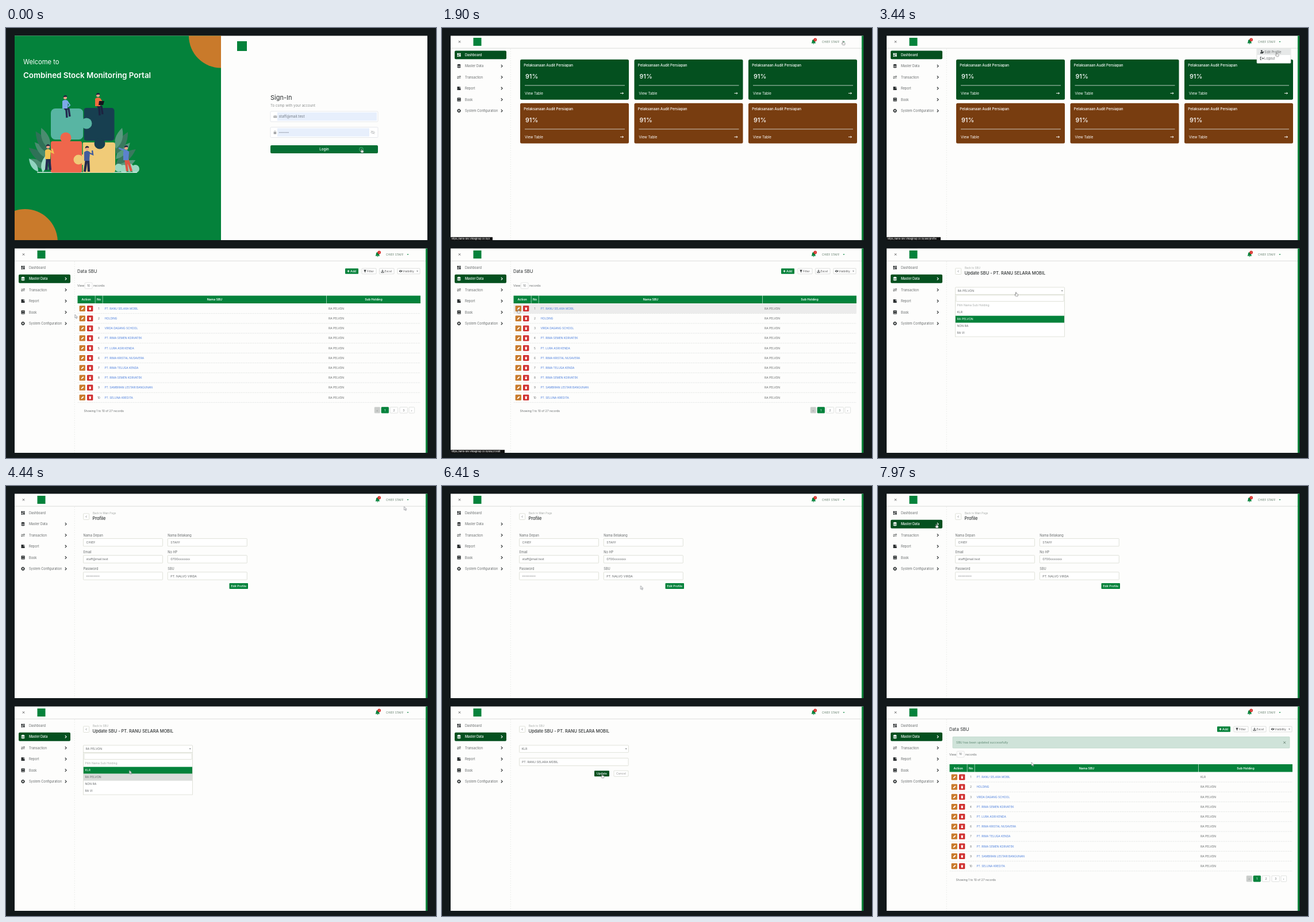
Animation of 748 by 748 pixels, one loop 8 s. Source, as an HTML page:

```html
<!DOCTYPE html>
<html lang="id">
<head>
<meta charset="utf-8">
<title>Dashboard walkthrough</title>
<style>
html, body { margin: 0; width: 100%; height: 100%; overflow: hidden; background: #12181a; }
svg { display: block; width: 100%; height: 100%; font-family: Inter, "Open Sans", sans-serif; }
</style>
</head>
<body>
<script>
const LOOP = 8000;
const GREEN = '#04823b', DEEP = '#04501f', BROWN = '#783d10', ORANGE = '#c97a2b';
const PAPER = '#fdfdfc', INK = '#2b2f30', GREY = '#666a6b', PALE = '#a4a8a6', EDGE = '#d3d6ca';
const FIRST = 'CHIEF', LAST = 'STAFF', MAIL = 'staff@mail.test';
const HOST = 'https://iams-dev.virdagroup.co.id/';
const UNITS = ['PT. RANU SELARA MOBIL', 'HOLDING', 'VIRDA DAGANG SCHOOL', 'PT. RIMA SEMEN KORVATEK',
  'PT. LURA ASRI KENDA', 'PT. RIMA KRISTAL NUSAVERA', 'PT. RIMA TELUGA KENDA', 'PT. RIMA SEMEN KORVATEK',
  'PT. SAMBIRAN LESTARI BANGUNAN', 'PT. SELUNA KREDITA'];
const MAIN_HOLDING = 'RA PELVON', NEW_HOLDING = 'KLR';

let css = '', serial = 0;

// Drawing helpers; text is placed by its vertical centre.
const text = (x, y, size, str, fill = GREY, extra = '') =>
  `<text x="${x}" y="${y + size * .36}" font-size="${size}" fill="${fill}" ${extra}>${str}</text>`;
const MID = 'text-anchor="middle"', MEDIUM = 'font-weight="500"', BOLD = 'font-weight="600"';
const rect = (x, y, w, h, fill, r = 0, stroke = 'none') =>
  `<rect x="${x}" y="${y}" width="${w}" height="${h}" rx="${r}" fill="${fill}" stroke="${stroke}" stroke-width=".7"/>`;
const circle = (x, y, r, fill) => `<circle cx="${x}" cy="${y}" r="${r}" fill="${fill}"/>`;
const shape = (d, fill) => `<path d="${d}" fill="${fill}"/>`;
const line = (d, stroke = INK, w = .8, extra = '') =>
  `<path d="${d}" fill="none" stroke="${stroke}" stroke-width="${w}" ${extra}/>`;
const at = (x, y, body) => `<g transform="translate(${x} ${y})">${body}</g>`;
const caret = (x, y, fill = GREY) => shape(`M${x - 1.5} ${y - .8}h3l-1.5 1.8z`, fill);

// Shows a group only between two times of the loop.
function during(from, to, body) {
  const name = 'show' + serial++;
  css += `@keyframes ${name}{0%{opacity:${from ? 0 : 1}}${from ? `${from / LOOP * 100}%{opacity:1}` : ''}` +
    `${to / LOOP * 100}%{opacity:0}}`;
  return `<g style="animation:${name} ${LOOP}ms step-end infinite">${body}</g>`;
}

function moving(stops, body) {
  const name = 'move' + serial++;
  const last = stops[stops.length - 1];
  css += `@keyframes ${name}{` + [...stops, [LOOP, last[1], last[2]]]
    .map(([t, x, y]) => `${t / LOOP * 100}%{transform:translate(${x}px,${y}px)}`).join('') + '}';
  return `<g style="animation:${name} ${LOOP}ms ease-in-out infinite">${body}</g>`;
}

const arrowCursor = `<path d="M0 0V6L1.5 4.7L2.6 7L3.6 6.5L2.6 4.3H4.4Z" fill="#fff" stroke="#7b7f86" stroke-width=".7"/>`;
const handCursor = `<path d="M-.6 .4Q0-.4 .6 .4V2.7L3 3.2Q3.8 3.5 3.6 4.6L3 7H-.4L-2.3 4.3Q-1.8 3.4-.6 4.5Z" fill="#fff" stroke="#555" stroke-width=".6"/>`;

function cursor(stops, hands) {
  let body = '', t = 0;
  for (const [from, to] of hands) {
    if (from > t) body += during(t, from, arrowCursor);
    body += during(from, to, handCursor);
    t = to;
  }
  if (t < LOOP) body += during(t, LOOP, arrowCursor);
  return moving(stops, body);
}

const icons = [
  c => shape('M-3-3h2.6v3.4H-3zM-3 1h2.6v2H-3zM.4-3H3v2H.4zM.4-.4H3V3H.4z', c),
  c => shape('M-3-2.2Q0-4.4 3-2.2V-1.2Q0 .5-3-1.2zM-3-.5Q0 1.2 3-.5V.7Q0 2.4-3 .7zM-3 1.4Q0 3 3 1.4V2.6Q0 4.2-3 2.6z', c),
  c => line('M-3-1.2H3L1.4-2.6M3 1.2H-3L-1.4 2.6', c, .8),
  c => shape('M-3-3H1V0H3V3H-3z', c) + line('M1.8-3V-1H3', c, .9),
  c => rect(-3, -3.3, 6.2, 6.6, c, .8) + line('M-1.5-1.4H2M-2 1.9H2.4', PAPER, .7),
  c => `<circle r="2" fill="none" stroke="${c}" stroke-width="1.4"/>` +
    `<circle r="3" fill="none" stroke="${c}" stroke-width="1" stroke-dasharray="1.2 1.156"/>`
];

function menuItem(label, i, active) {
  const y = 46.7 + i * 19.45, c = active ? '#fff' : INK;
  return (active ? rect(22, y - 7.3, 90, 14.8, DEEP, 2) : '') + at(29.5, y, icons[i](c)) +
    text(40, y, 5.6, label, active ? '#fff' : GREY, active ? MEDIUM : '') +
    (i ? line(`M102.8 ${y - 2.3}l2.3 2.3l-2.3 2.3`, c, 1.1) : '');
}
const MENU = ['Dashboard', 'Master Data', 'Transaction', 'Report', 'Book', 'System Configuration'];

const chrome = active => rect(15, 13.5, 718, 355.5, PAPER) + rect(730, 13.5, 3.2, 355.5, GREEN) +
  line('M15 35.2H730', '#d2d5d2', .8) + line('M119.3 36V369', '#dfe2df', .6, 'stroke-dasharray="2 2"') +
  line('M28.8 22.2l3.4 3.4m0-3.4l-3.4 3.4', '#444') + rect(54.5, 17, 14, 14, GREEN) +
  shape('M642.5 26.6Q643.8 25 643.8 22.8Q644 20 646.4 20Q649 20 649 22.8Q649 25 650.2 26.6zM645.2 27.2h2.4q-1.2 2-2.4 0', GREEN) +
  circle(649.2, 20.4, 2.8, '#d9302c') + text(649.2, 20.4, 3.2, '1', '#fff', MID) +
  text(661, 24.2, 4.9, `${FIRST} ${LAST}`, '#66806f') + caret(699, 24, GREEN) +
  MENU.map((m, i) => menuItem(m, i, i === active)).join('');

const status = (path, w) => rect(15, 363.8, w, 5.8, '#111') +
  text(16.5, 366.6, 3.9, HOST + path, '#fff', MEDIUM);

function person(x, y, top, legs, lean = 0) {
  return at(x, y, line(`M-1 20L${-3 - lean} 42M2 20L${4 - lean} 42`, legs, 4.2) +
    shape('M-5 8Q0 3 5 8L4 23H-5z', top) + line(`M3 9L${9 + lean} 12L${7 + lean * 2} 5`, top, 2.4) +
    circle(0, 1.5, 3, '#f0a58a') + shape('M-3.4 1.5Q-3-3.2 1-2.6Q4-2 3 .4Q-.5-.5-3.4 1.5', '#23243f'));
}
const sitter = (x, y, top, legs) => at(x, y, line('M-2 18L6 21L8 34M-2 18L2 23L3 36', legs, 3.4) +
  shape('M-5 7Q0 3 5 7L4 20H-5z', top) + line('M4 8L8 14L5 17', top, 2.2) +
  circle(0, 1, 3, '#f0a58a') + shape('M-3.4 1Q-3-3.6 1-3Q4-2 3 0Q-.5-1-3.4 1', '#23243f'));
const leaf = (x, y, angle, size, fill) =>
  `<path transform="translate(${x} ${y}) rotate(${angle}) scale(${size})" d="M0 0Q-9-12 0-28Q9-12 0 0" fill="${fill}"/>`;

function illustration() {
  const teal = '#58b5a3', navy = '#173f50', coral = '#ef664c', sand = '#f0cb78';
  let leaves = '';
  for (let i = 0; i < 5; i++) {
    leaves += leaf(76, 246 - i * 9, -62 + i * 10, 1.4 + i % 2 * .25, i % 2 ? '#2f7157' : '#4a8c70') +
      leaf(191, 246 - i * 9, 65 - i * 12, 1.35 + i % 2 * .2, i % 2 ? '#39795e' : '#579a7e');
  }
  return leaves + leaf(56, 250, -35, 1, '#91d3c0') + leaf(64, 251, 8, 1, '#a3ddc9') +
    [196, 205, 215, 225].map((x, i) => circle(x, 243 + i % 2 * 2, 7, '#9cd8c1')).join('') +
    rect(54, 250.5, 174, 1.6, '#d6eee5', .8) +
    rect(135, 139, 53.5, 57, navy, 5) + rect(78, 140, 56.5, 54, teal, 8) + circle(140, 166, 9.5, teal) +
    rect(78, 197, 54, 54.5, coral, 3) + circle(104, 191, 9.5, coral) +
    rect(132, 199, 58, 52.5, sand, 4) + circle(126, 229, 8.5, sand) + circle(163, 201, 9.5, navy) +
    line('M78 195.5H94M114 195.5H135V176M135 156V139M133 198V220M133 238V251M135 197.5H153M173 197.5H190', GREEN, 1.4) +
    sitter(103, 120, '#7ea8e8', '#252b50') + sitter(160, 116, '#f06e3f', '#1c2340') +
    shape('M162 127h9l-2 7h-8z', '#12151d') +
    person(73, 205, '#f1c352', '#252b50') + person(141, 208, '#435d9d', '#232a4d', 1) +
    person(209, 207, '#5c82ce', '#dd5544', -5) + line('M207 213L196 209', '#5c82ce', 2.4);
}

function loginPage() {
  const field = (y, w) => rect(460, y, 187, 18, '#fff', 1.5, '#dcdfe4') + rect(472, y + 1.8, w, 14.4, '#e7effc');
  return rect(15, 13.5, 718, 355.5, PAPER) + rect(15, 13.5, 359, 355.5, GREEN) +
    shape('M318 13.5H374V69.5A56 56 0 0 1 318 13.5', ORANGE) +
    shape('M15 318Q23 315 33 315A57 57 0 0 1 89.8 369H15z', ORANGE) +
    text(30, 58.5, 11.2, 'Welcome to', '#fff') +
    text(30, 82.5, 13.4, 'Combined Stock Monitoring Portal', '#fff', BOLD) + illustration() +
    rect(402, 23, 17, 17, GREEN) +
    text(460, 121, 11, 'Sign-In', INK) + text(460, 134.5, 6.1, 'To csmp with your account', '#8a8e8d') +
    field(145, 173) + rect(465.3, 152.3, 6, 4, '#a8aaac', .5) + line('M465.3 152.5l3 2l3-2', '#fff', .6) +
    text(474.5, 154, 6.4, MAIL, '#737b85') +
    field(172.5, 160) + rect(465.6, 181, 4.6, 3.6, '#a0a2a4', .5) + line('M466.5 181v-1.2q1.4-2 2.8 0v1.2', '#a0a2a4') +
    line('M475 181.8H492', '#6d7480', 1, 'stroke-dasharray="1.3 .9"') +
    line('M634.6 181.5Q638 177.8 641.4 181.5Q638 185.2 634.6 181.5M635 178.5l6 6', '#a5a8aa', .7) +
    rect(460, 204, 187, 14, '#066f34', 2) + text(553.5, 211, 6.2, 'Login', '#fff', MID + ' ' + MEDIUM) +
    `<circle cx="618" cy="211" r="3.4" fill="none" stroke="#5fd08c" stroke-width=".7"/>`;
}

function dashboardPage() {
  let body = chrome(0);
  for (let i = 0; i < 6; i++) {
    body += at(136 + i % 3 * 198.5, 54.7 + (i > 2) * 76, rect(0, 0, 189, 70, i > 2 ? BROWN : DEEP, 2.5) +
      text(6.3, 10.5, 6.2, 'Pelaksanaan Audit Persiapan', '#fff', MEDIUM) +
      text(9, 29.3, 10.9, '91%', '#fff', MEDIUM) + line('M8 45.2H182', '#e5ebe6', .8) +
      text(8, 58.8, 6.2, 'View Table', '#fff') + line('M174 58.8h5.5m-1.8-1.8l1.8 1.8l-1.8 1.8', '#fff', .9));
  }
  return body;
}

const accountMenu = hover => rect(659, 35.8, 59, 25.4, '#fff', 1, '#d5d8d5') +
  (hover ? rect(659.3, 36.2, 58.4, 10.8, '#e6e8e8') : '') +
  circle(667.3, 40, 1.4, INK) + shape('M664.8 44.2Q665 41.6 668.4 41.8L671.8 40.4L669.5 44.2z', INK) +
  text(673, 41.7, 5.6, 'Edit Profile') +
  line('M667 50.6h-1.8v4.6h1.8M667.3 52.9h3.4m-1.4-1.4l1.4 1.4l-1.4 1.4', INK, .9) + text(672, 52.9, 5.6, 'Logout');

const heading = (back, title) => rect(134.6, 48, 10, 10.5, '#fff', 1, EDGE) + line('M140.3 51.7l-1.5 1.6l1.5 1.6', GREY, .7) +
  text(151, 47.7, 4.6, back, PALE) + text(150.5, 56.2, 7.4, title, INK, MEDIUM);

function profilePage() {
  const fields = ['Nama Depan', FIRST, 'Nama Belakang', LAST, 'Email', MAIL, 'No HP', '0700xxxxxxx',
    'Password', '•••••••••', 'SBU', 'PT. NALVO VIRDA'];
  let body = chrome(-1) + heading('Back to Main Page', 'Profile');
  for (let i = 0; i < 6; i++) {
    body += at(134.5 + i % 2 * 146.8, 86 + (i >> 1) * 29.2, text(0, 0, 5.6, fields[2 * i]) +
      rect(0, 5.4, 138, 13.4, '#fff', .8, EDGE) + text(5, 12.2, i === 4 ? 4.6 : 5.4, fields[2 * i + 1]));
  }
  return body + rect(388.5, 169, 32.5, 10, GREEN, 1) + text(404.8, 174, 5.2, 'Edit Profile', '#fff', MID + ' ' + MEDIUM);
}

function toolButton(x, w, label, icon) {
  return rect(x, 48.2, w, 9.6, '#fff', 1, '#cfd2cf') + at(x + 5.5, 53, icon) + text(x + 9, 53, 5, label, '#555');
}

function table(holding) {
  const columns = [[124.5, 30.3, 'Action'], [155.4, 12.4, 'No'], [168.4, 389, 'Nama SBU'], [558, 163, 'Sub Holding']];
  let body = text(124, 78.2, 5.4, 'View') + rect(137.3, 73, 12.6, 10.5, '#fff', 1, '#d8dad8') +
    text(143.6, 78.2, 5, '10', GREY, MID) + text(152, 78.2, 5.4, 'records') +
    columns.map(([x, w, label]) => rect(x, 95.6, w, 13.4, GREEN) + text(x + w / 2, 102.3, 5.2, label, '#fff', MID + ' ' + BOLD)).join('');
  UNITS.forEach((unit, i) => {
    body += at(0, 118 + i * 17.2, rect(127.6, -5, 10.3, 10, ORANGE, 1.2) + rect(141, -5, 10.3, 10, '#cf2d2d', 1.2) +
      shape('M130.6 2.4l.5-1.8l3-3l1.4 1.3l-3 3z', '#fff') +
      shape('M144.6-1h3.2v3.6h-3.2zM144.1-2.2h4.2v.8h-4.2z', '#fff') +
      text(161.4, 0, 4.8, i + 1, GREY, MID) + text(171.5, 0, 4.8, unit, '#4c7fdc') +
      text(561, 0, 4.9, i ? MAIN_HOLDING : holding) +
      line('M124.5 8.6H721', '#d9dcda', .6, 'stroke-dasharray="3 1"'));
  });
  body += text(135.5, 296.6, 5, 'Showing 1 to 10 of 27 records');
  [[641, 9.6, '‹'], [653, 12.6, 1], [668.2, 13.4, 2], [685, 13.4, 3], [701, 9.6, '›']].forEach(([x, w, label], i) => {
    body += rect(x, 289.6, w, 10.2, ['#c9ccca', GREEN][i] || '#fff', 1, i === 1 ? GREEN : '#d3d6d3') +
      text(x + w / 2, 294.8, 4.9, label, i === 1 ? '#fff' : GREY, MID);
  });
  return body;
}

const listHeader = () => chrome(1) + text(124, 53, 7.7, 'Data SBU', INK) +
  rect(590, 48.2, 23, 9.6, GREEN, 1) + line('M593.5 53h4m-2-2v4', '#fff', 1) + text(599, 53, 5.2, 'Add', '#fff', MEDIUM) +
  toolButton(619, 25, 'Filter', shape('M-2.3-2.3H2.3L.7 0V2.5L-.7 1.5V0z', INK)) +
  toolButton(649.5, 25.5, 'Excel', line('M0-2.5V.7M-1.4-.6L0 .9L1.4-.6M-2.2 1V2.3H2.2V1', INK, .9)) +
  toolButton(681, 39, 'Visibility', shape('M-3 0Q0-3.4 3 0Q0 3.4-3 0', INK) + circle(0, 0, .9, '#fff')) + caret(715.5, 53);

const successBanner = () => rect(130, 66.3, 586, 19.6, '#cfe3d9', 1, '#b9d5c6') +
  text(136, 76.2, 5.3, 'SBU has been updated successfully', '#5f8973') +
  line('M705.3 74.4l3.8 3.8m0-3.8l-3.8 3.8', '#55705f');

const selectBox = value => rect(134.5, 81, 190, 12.6, '#fff', 1, EDGE) + text(138.5, 87.4, 5.2, value) + caret(320.2, 87.2);

const updatePage = () => chrome(1) + heading('Back to SBU', `Update SBU - ${UNITS[0]}`) +
  rect(134.5, 103.4, 189.6, 13.2, '#fff', .8, EDGE) + text(139, 110, 5.2, UNITS[0]) +
  rect(265, 125.2, 26, 10, DEEP, 1) + text(278, 130.2, 5.2, 'Update', '#fff', MID + ' ' + MEDIUM) +
  rect(299, 125.2, 25, 10, '#fff', 1, EDGE) + text(311.5, 130.2, 5.2, 'Cancel', '#999', MID);

function optionList(hover) {
  const options = ['Pilih Nama Sub Holding', NEW_HOLDING, MAIN_HOLDING, 'NON RA', 'RA VI'];
  return rect(134.5, 93.6, 190, 73.4, '#fff', 0, EDGE) + rect(136, 95, 187, 10.4, '#fff', 0, EDGE) +
    options.map((o, i) => {
      const y = 112.6 + i * 12;
      const fill = i === hover ? GREEN : i === 2 ? '#dadcda' : 'none';
      return rect(134.8, y - 6, 189.2, 12, fill) + text(137.5, y, 5.1, o, i === hover ? '#fff' : i ? GREY : PALE);
    }).join('');
}

const topPanel = during(0, 900, loginPage()) + during(900, 3900, dashboardPage()) +
  during(2350, 2780, accountMenu(false)) + during(2780, 3900, accountMenu(true)) +
  during(1650, 2700, status('#', 73)) + during(2780, 3900, status('user/profile', 94)) +
  during(3900, LOOP, profilePage()) + during(7550, LOOP, menuItem(MENU[1], 1, true)) +
  cursor([[0, 618.5, 210], [1200, 618.5, 210], [1750, 697.5, 22.5], [2450, 697.5, 22.5], [2900, 693.5, 42.5],
    [3900, 693.5, 42.5], [4100, 692.5, 35.8], [4900, 692.5, 35.8], [5800, 345.5, 173.6], [6700, 345.5, 173.6],
    [7700, 101.5, 66]], [[0, 900], [1650, 3900], [7550, LOOP]]);

const bottomPanel = during(0, 2400, listHeader() + during(550, 2400, rect(124.5, 109.4, 596.5, 17, '#ececec')) + table(MAIN_HOLDING)) +
  during(550, 2400, status('sbu/27/edit', 94)) +
  during(2400, 7000, updatePage() + during(2400, 4800, selectBox(MAIN_HOLDING)) + during(4800, 7000, selectBox(NEW_HOLDING)) +
    during(3150, 4150, optionList(2)) + during(4150, 4800, optionList(1))) +
  during(7000, LOOP, listHeader() + successBanner() + at(0, 18.4, table(NEW_HOLDING))) +
  cursor([[0, 120, 128.5], [200, 120, 128.5], [750, 132.5, 119.2], [2400, 132.5, 119.2], [3000, 240, 89.5],
    [3800, 240, 89.5], [4300, 214.5, 124.5], [5000, 214.5, 124.5], [5800, 278.5, 130.8], [7050, 278.5, 130.8],
    [7500, 267, 110.6]], [[550, 2400], [2900, 3900], [5650, 7000]]);

const picture = `<svg viewBox="0 0 748 748">${topPanel}${at(0, 370, bottomPanel)}</svg>`;
document.head.insertAdjacentHTML('beforeend', `<style>${css}</style>`);
document.body.insertAdjacentHTML('beforeend', picture);
</script>
</body>
</html>
```
